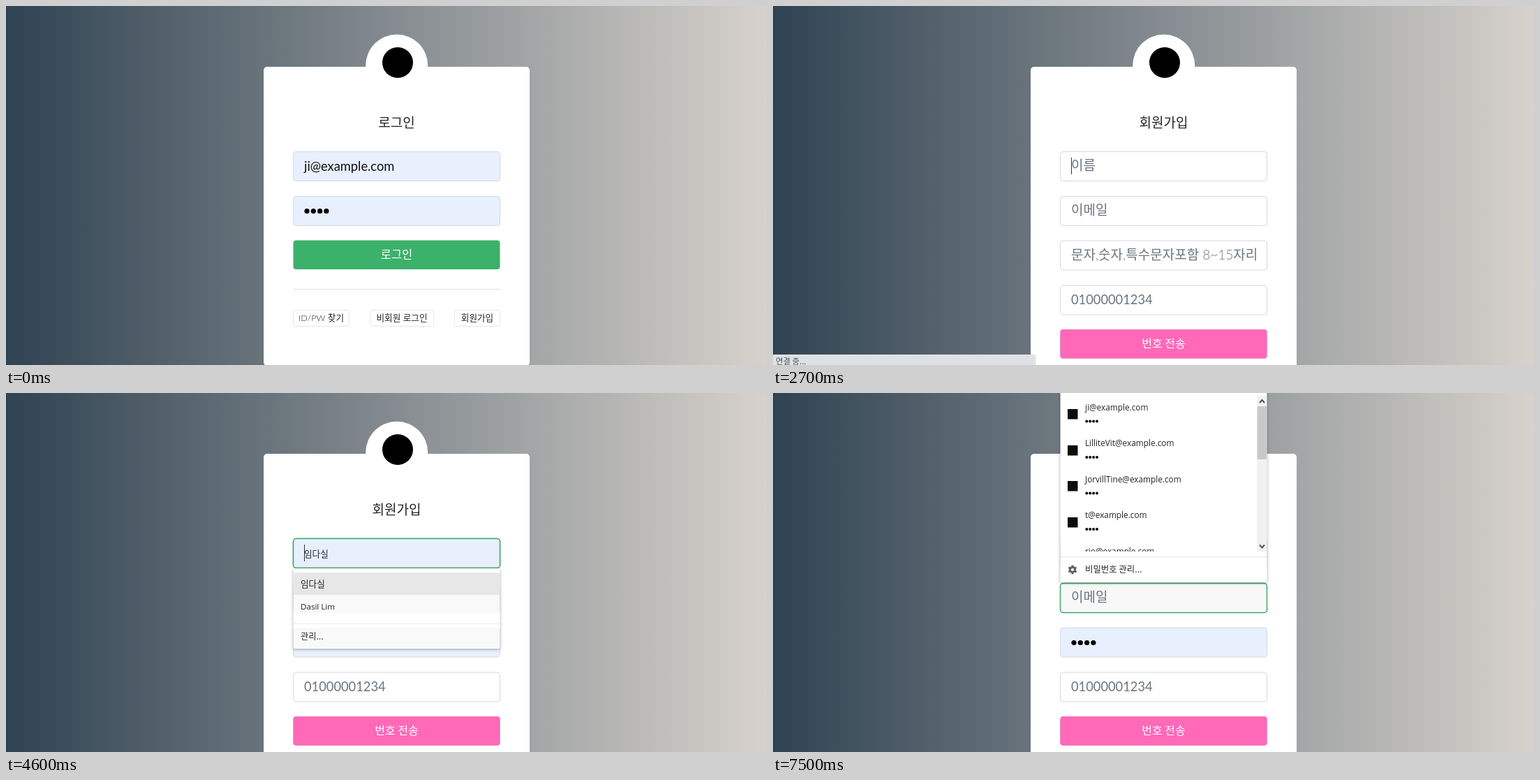
Animation of 1090 by 514 pixels, one loop 8000 ms. Source, as an HTML page with a canvas:

```html
<!DOCTYPE html>
<html lang="ko">
<head>
<meta charset="utf-8">
<style>
html, body { margin: 0; width: 100%; height: 100%; overflow: hidden; }
canvas { display: block; }
</style>
</head>
<body>
<canvas id="stage" width="1090" height="514"></canvas>
<script>
const c = document.getElementById('stage').getContext('2d');
const W = 1090, H = 514, LOOP = 8000;
const KR = '"Noto Sans CJK KR", "Noto Sans CJK", sans-serif';
const LATIN = 'Lato, ' + KR;
const SMALL = '"Open Sans", ' + KR;
const INK = '#212529', HINT = '#6c757d', EDGE = '#d3d8dd', GREEN = '#3cab69', FILLED = '#e8f0fe';
const USER = 'ji@example.com', NAME = '임다실';
const ACCOUNTS = [USER, 'LilliteVit@example.com', 'JorvillTine@example.com', 't@example.com', 'rio@example.com'];

const sky = c.createLinearGradient(0, 0, W, 0);
sky.addColorStop(0, '#304352');
sky.addColorStop(1, '#d7d2cc');

let t = 0;
const within = (a, b) => t >= a && t < b;
// Rises to 1 in n steps of 100 ms, the first one at time a
const ramp = (a, n) => Math.max(0, Math.min(1, (Math.floor((t - a) / 100) + 1) / n));

function rect(x, y, w, h, color) {
  c.fillStyle = color;
  c.fillRect(x, y, w, h);
}

function box(x, y, w, h, r, fill, edge, line = 1) {
  c.beginPath();
  c.roundRect(x, y, w, h, r);
  c.fillStyle = fill;
  c.fill();
  if (edge) {
    c.strokeStyle = edge;
    c.lineWidth = line;
    c.stroke();
  }
}

function disc(x, y, r, color) {
  c.fillStyle = color;
  c.beginPath();
  c.arc(x, y, r, 0, 7);
  c.fill();
}

// mid is the vertical middle of the glyphs
function text(s, x, mid, size, { color = INK, font = KR, weight = 400, align = 'left' } = {}) {
  c.font = `${weight} ${size}px ${font}`;
  c.fillStyle = color;
  c.textAlign = align;
  c.fillText(s, x, mid + size * 0.37);
}

function dots(x, y, r, gap) {
  for (let i = 0; i < 4; i++) disc(x + i * gap, y, r, '#000');
}

function faded(alpha, draw) {
  if (alpha <= 0) return;
  c.save();
  c.globalAlpha = alpha;
  draw();
  c.restore();
}

function field(y, fill = '#fff', focus = false) {
  box(411.5, y + 0.5, 296, 42, 4, fill, focus ? GREEN : EDGE, focus ? 1.5 : 1);
}

const hint = (s, mid) => text(s, 427, mid, 19, { color: HINT, weight: 300, font: LATIN });
const email = mid => text(USER, 427, mid, 18.3, { color: '#111', font: LATIN });
const secret = y => dots(431, y, 3.6, 9.3);
const caret = (x, y) => rect(x, y, 1, 24, '#333');

function frame(title, bottom) {
  rect(0, 0, W, H, sky);
  box(369, 87, 381, bottom - 87, 5, '#fff');
  disc(559.7, 85.3, 44.5, '#fff');
  disc(561, 81, 22, '#000');
  text(title, 559.5, 167, 19, { weight: 300, align: 'center' });
}

function bigButton(y, label, color, size) {
  box(411.5, y, 296, 41.5, 4, color);
  text(label, 559.5, y + 20, size, { color: '#fff', align: 'center' });
}

function smallButton(x, w, label, hover = 0) {
  box(x + 0.5, 435.5, w - 1, 23, 3, '#fff', '#e4e6e8');
  faded(hover, () => box(x, 435, w, 24, 3, '#dfdfdf'));
  text(label, x + w / 2, 446, 12.6, {
    color: hover && t >= 1000 ? '#444' : INK, weight: 300, font: LATIN, align: 'center'
  });
}

function loginPage() {
  frame('로그인', 515);
  field(208, FILLED);
  email(229);
  field(272, FILLED);
  secret(293.7);
  bigButton(335.5, '로그인', '#3cb16b', 16.5);
  rect(411, 405, 297, 1, '#dfe0e2');
  smallButton(411, 81, 'ID/PW 찾기');
  smallButton(521, 92, '비회원 로그인');
  smallButton(642, 66, '회원가입', ramp(400, 3));
}

function popup(y, h, alpha, draw) {
  faded(alpha, () => {
    c.save();
    c.shadowColor = 'rgba(0,0,0,.35)';
    c.shadowBlur = 4;
    c.shadowOffsetY = 1;
    box(411.5, y, 296, h, 2, '#fff');
    c.restore();
    draw();
  });
}

function namePopup() {
  rect(412, 271, 295, 44, '#f9f9f9');
  rect(412, 336, 295, 29, '#f9f9f9');
  rect(412, 330, 295, 1, '#ececec');
  faded(ramp(4500, 2), () => rect(412, 257, 295, 32, '#e7e7e7'));
  text(NAME, 422, 273, 12.6);
  text('Dasil Lim', 422, 306, 11.6, { font: SMALL });
  text('관리...', 422, 348, 12.2);
}

function arrow(y, dir) {
  c.strokeStyle = '#505050';
  c.lineWidth = 2;
  c.beginPath();
  c.moveTo(697, y + 2 * dir);
  c.lineTo(700.5, y - 2 * dir);
  c.lineTo(704, y + 2 * dir);
  c.stroke();
}

function gear(x, y) {
  c.strokeStyle = '#5f6368';
  c.lineWidth = 3;
  c.beginPath();
  c.arc(x, y, 3.6, 0, 7);
  c.stroke();
  for (let i = 0; i < 6; i++) {
    const a = (i + 0.5) * Math.PI / 3;
    c.beginPath();
    c.moveTo(x + 4 * Math.cos(a), y + 4 * Math.sin(a));
    c.lineTo(x + 6.4 * Math.cos(a), y + 6.4 * Math.sin(a));
    c.stroke();
  }
}

function accountPopup() {
  c.save();
  c.beginPath();
  c.rect(412, 0, 295, 227);
  c.clip();
  ACCOUNTS.forEach((name, i) => {
    const y = 20.5 + i * 51.5;
    rect(422, Math.round(y + 2.5), 14.5, 14.5, '#0c0c0c');
    text(name, 447, y, 11.8, { font: SMALL });
    dots(449.3, y + 20, 2, 4.9);
  });
  c.restore();
  rect(412, 227, 281, 8, '#fff');
  rect(693.5, 4, 13.5, 223, '#f1f1f1');
  rect(693.5, 19, 13.5, 76, '#c8c8c8');
  arrow(12, 1);
  arrow(219.5, -1);
  rect(412, 234, 295, 1, '#e8e8e8');
  gear(429, 253);
  text('비밀번호 관리...', 447, 252, 12.4);
}

function nameField() {
  const preview = ramp(4500, 2), chosen = t >= 5600;
  field(208, '#fff', within(2800, 6200));
  faded(preview, () => field(208, FILLED, t < 6200));
  if (chosen) text(NAME, 427, 228, 19, { color: '#111', weight: 300 });
  else if (preview) text(NAME, 427, 230, 12.6);
  else hint('이름', 228);
  if (within(2700, 3200) || within(3600, 4100) || within(4600, 5000) || within(5500, 5600)) caret(427, 217);
}

function signupPage() {
  const filled = t >= 2800, cleared = t >= 7000;
  frame('회원가입', 560);
  nameField();

  field(272, cleared ? '#f8f8f8' : filled ? FILLED : '#fff', t >= 6200);
  if (filled && !cleared) email(293);
  else hint('이메일', 292);
  if (within(7000, 7500)) caret(427, 281);

  field(335.5, filled ? FILLED : '#fff');
  if (filled) secret(357.5);
  else hint('문자,숫자,특수문자포함 8~15자리', 356);

  field(399.5);
  text('01000001234', 427, 420.5, 18.3, { color: HINT, font: LATIN });
  box(411.5, 463.5, 296, 41, 4, '#ff69b8', '#dcc3d2');
  bigButton(463, '번호 전송', '#ff69b8', 16);

  if (t >= 3600) popup(251, 115, 1 - ramp(5600, 3), namePopup);
  popup(-10, 281, ramp(6300, 3), accountPopup);
}

function statusBar() {
  faded(Math.min(ramp(1200, 2), 1 - ramp(3000, 3)), () => {
    box(-5, 499, 381.5, 20, 3, '#dee1e6');
    text('연결 중...', 4, 508.5, 11.4, { color: '#50555a' });
  });
}

function draw(now) {
  t = now % LOOP;
  if (t < 2000) loginPage();
  else if (t < 2700) rect(0, 0, W, H, '#fefefe');
  else signupPage();
  statusBar();
  requestAnimationFrame(draw);
}
requestAnimationFrame(draw);
</script>
</body>
</html>
```
